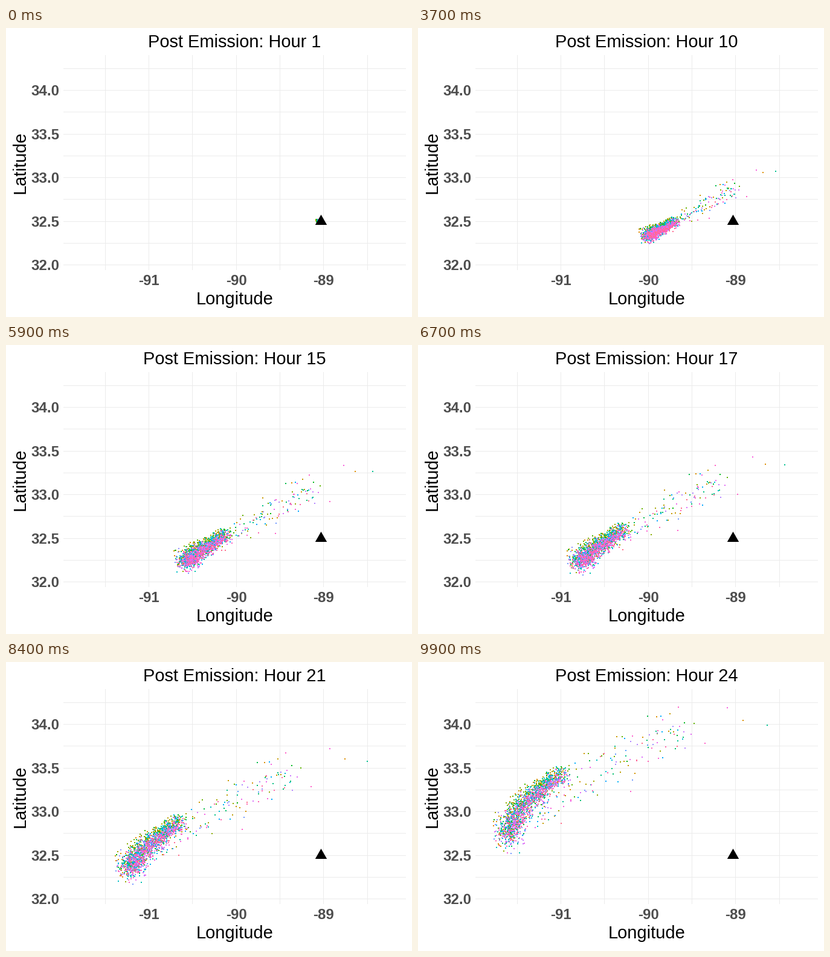
Animation, 672 px wide and 480 px high, one loop 10 s. Source, as a matplotlib script:

```python
import numpy as np
import matplotlib.pyplot as plt
from matplotlib.animation import FuncAnimation

W, H, DPI = 672, 480, 96
FRAMES, INTERVAL, HOURS = 100, 100, 24
LEFT, RIGHT, TOP, BOTTOM = 95, 662, 45, 402
plt.rcParams["font.family"] = "Liberation Sans"

# Each particle has a place along the plume (0 head, 1 far end),
# a response to the turning wind and a fixed scatter.
rng = np.random.default_rng(24)
CORE, TAIL, FAR = 1650, 190, 3
N = CORE + TAIL + FAR
along = np.concatenate([0.27 * rng.random(CORE) ** 1.8,
                        0.12 + 0.8 * rng.random(TAIL) ** 1.6,
                        np.linspace(1.1, 1.25, FAR)])
turn = np.concatenate([np.ones(CORE),
                       1 - rng.random(TAIL) ** 2,
                       np.full(FAR, 1.6)])
scatter = np.clip(rng.normal(size=(N, 2)), -2.5, 2.5)
width = np.minimum(0.6 + 2 * np.abs(along - 0.2), 1.4)
ids = rng.uniform(0.07, 0.97, N)
order = np.argsort(ids)


def hue_colors(ids):
    """Evenly spaced hues at luminance 65 and chroma 100."""
    angle = np.radians(15 + 360 * ids)
    u = 100 * np.cos(angle) / (13 * 65) + 0.19784
    v = 100 * np.sin(angle) / (13 * 65) + 0.46834
    y = np.full_like(u, ((65 + 16) / 116) ** 3)
    x = 9 * y * u / (4 * v)
    z = 3 * y / v - 5 * y - x / 3
    to_rgb = np.array([[3.2405, -1.5371, -0.4985],
                       [-0.9693, 1.8760, 0.0416],
                       [0.0556, -0.2040, 1.0572]])
    rgb = np.clip(np.stack([x, y, z], axis=1) @ to_rgb.T, 0, 1)
    return np.where(rgb > 0.0031308, 1.055 * rgb ** (1 / 2.4) - 0.055, 12.92 * rgb)


def positions(k):
    t = k / (FRAMES - 1)
    # The head drifts west, sinks south and is then swept north
    head_x = 518 - 369 * t
    head_y = 320 + 45 * t + 60 * t ** 2 - 130 * t ** 5
    # The plume stretches north-east and bows as the wind turns
    reach_x = 510 * t * (1 - 0.34 * t)
    reach_y = 280 * t * (1 - 0.25 * t)
    bow = 1.25 - 0.75 * turn * t ** 1.5
    spine = np.stack([head_x + reach_x * along,
                      head_y - reach_y * along ** bow], axis=1)
    spread = 1 + 9 * np.sin(np.pi / 2 * t) ** 1.3
    lean = np.array([7, 6 * np.sqrt(t)])
    xy = spine + scatter * (spread * width)[:, None] + (ids[:, None] - 0.5) * lean
    return np.round(xy[order])


fig = plt.figure(figsize=(W / DPI, H / DPI), dpi=DPI, facecolor="white")
ax = fig.add_axes([0, 0, 1, 1])
ax.set(xlim=(0, W), ylim=(H, 0))
ax.axis("off")


def label(x, y, text, size=29, **kw):
    style = {"ha": "center", "va": "baseline", "rotation_mode": "anchor", **kw}
    return ax.text(x, y, text, fontsize=size * 72 / DPI, **style)


def tick(x, y, text, ha):
    label(x, y, text, 24, ha=ha, weight="bold", color="#4D4D4D")


grid = dict(colors="#EBEBEB", linewidths=72 / DPI, snap=False, zorder=1)
xs = np.floor(164.3 + 72.3 * np.arange(7)) + 0.5
ys = np.floor(393.4 - 36.2 * np.arange(10)) + 0.5
ax.vlines(xs, TOP, BOTTOM, **grid)
ax.hlines(ys, LEFT, RIGHT, **grid)
for i, x in enumerate(xs[1::2]):
    tick(x, 427, f"{i - 91}", "center")
for i, y in enumerate(ys[::2]):
    tick(88.5, y + 8.5, f"{32 + i / 2:.1f}", "right")

mid_x, mid_y = (LEFT + RIGHT) / 2, (TOP + BOTTOM) / 2
title = label(mid_x, 32, "")
label(mid_x, 459, "Longitude")
label(32, mid_y, "Latitude", rotation=90)

dots = ax.scatter(*positions(0).T, s=(2 * 72 / DPI) ** 2, marker="s", linewidths=0,
                  c=hue_colors(ids[order]), antialiased=False, zorder=3)
ax.fill([521.5, 531.2, 511.8], [310, 327, 327], color="black", lw=0, zorder=4)


def draw(k):
    title.set_text(f"Post Emission: Hour {int(1.5 + (HOURS - 1) * k / (FRAMES - 1))}")
    dots.set_offsets(positions(k))
    return title, dots


anim = FuncAnimation(fig, draw, frames=FRAMES, interval=INTERVAL,
                     init_func=lambda: draw(0), repeat=True, repeat_delay=0)
plt.show()
```
